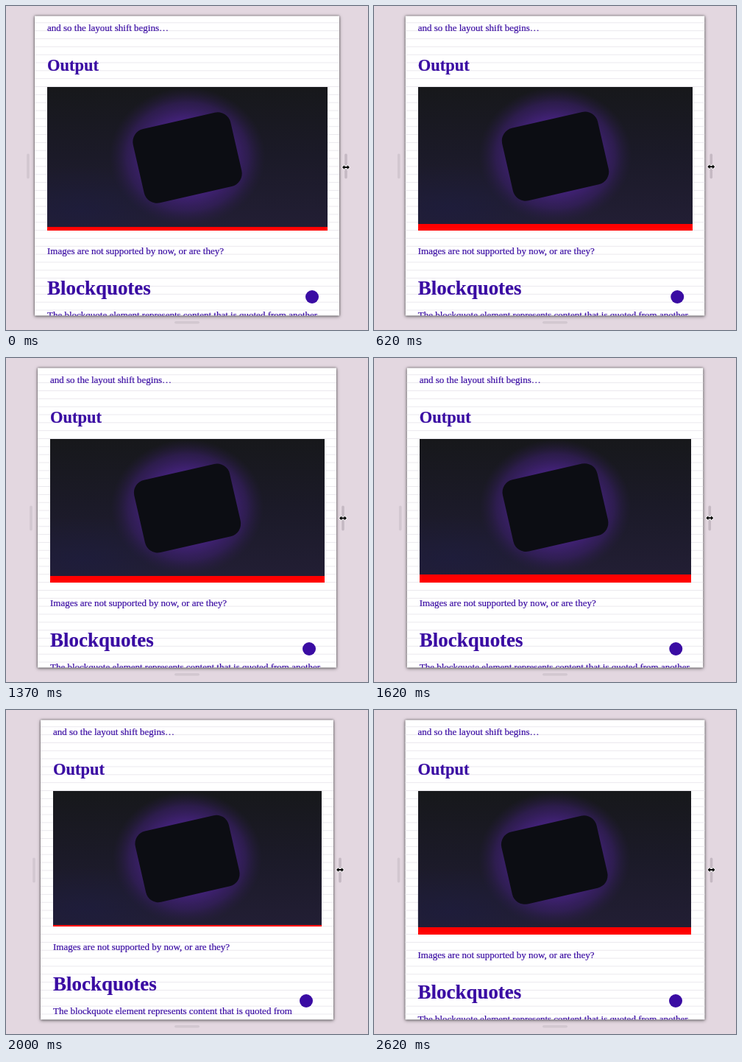
Recreate the animation shown at these times as an HTML page. Size 492x440 px, loop 2750 ms.

```html
<!DOCTYPE html>
<html lang="en">
<head>
<meta charset="utf-8">
<title>Resizing a page</title>
<style>
  html, body { margin: 0; width: 100%; height: 100%; overflow: hidden; background: #e3d7e0; }
  svg { display: block; width: 492px; height: 440px; }
  text {
    font: 13px "Liberation Serif", "Times New Roman", serif;
    fill: #3a0ca3; stroke: #3a0ca3; stroke-width: .2px;
  }
  .h2 { font-size: 22.46px; font-weight: bold; }
  .h1 { font-size: 26.96px; font-weight: bold; }
  #paper { fill: #fff; filter: drop-shadow(0 0 1px rgba(0,0,0,.5)) drop-shadow(0 1px 2px rgba(0,0,0,.5)); }
</style>
</head>
<body>
<svg viewBox="0 0 492 440">
  <defs>
    <clipPath id="clip"><rect id="clipBox" y="13.5" height="407"/></clipPath>
    <linearGradient id="night" x2="0" y2="1">
      <stop offset="0" stop-color="#17181b"/>
      <stop offset=".5" stop-color="#1b1a28"/>
      <stop offset="1" stop-color="#221e34"/>
    </linearGradient>
    <radialGradient id="blue" cx=".12" cy=".85" r=".4">
      <stop offset="0" stop-color="#1b1c48" stop-opacity=".4"/>
      <stop offset="1" stop-color="#1b1c48" stop-opacity="0"/>
    </radialGradient>
    <radialGradient id="glow">
      <stop offset="0" stop-color="#4b2488"/>
      <stop offset=".55" stop-color="#45227e" stop-opacity=".9"/>
      <stop offset=".78" stop-color="#3a1f69" stop-opacity=".6"/>
      <stop offset="1" stop-color="#2a1c48" stop-opacity="0"/>
    </radialGradient>
  </defs>

  <rect id="paper" y="13.5" height="407"/>
  <g clip-path="url(#clip)">
    <path id="rules" stroke="#ebe9ee"/>
    <g id="content">
      <text y="33.6">and so the layout shift begins…</text>
      <text class="h2" y="88">Output</text>
      <rect id="box" y="200" fill="#f00" shape-rendering="crispEdges"/>
      <rect id="sky" y="109.5" fill="url(#night)" shape-rendering="crispEdges"/>
      <g id="picture">
        <rect y="40" width="381" height="150" fill="url(#blue)"/>
        <ellipse cx="190.5" cy="95" rx="106" ry="94" fill="url(#glow)"/>
        <rect x="-68" y="-51.5" width="136" height="103" rx="18" fill="#0c0d13"
              transform="translate(190.5 96.5) rotate(-12.9)"/>
      </g>
      <g id="below">
        <text y="337.2">Images are not supported by now, or are they?</text>
        <text class="h1" y="391.8">Blockquotes</text>
        <text id="quote" y="423.8"></text>
      </g>
      <circle id="button" cy="395" r="9" fill="#3a0ca3"/>
    </g>
  </g>

  <g fill="#d2c7d0">
    <rect id="left" y="200.5" width="3.6" height="34" rx="1.8"/>
    <rect id="right" y="200.5" width="3.6" height="34" rx="1.8" fill="#c5b9c3"/>
    <rect x="229" y="428" width="34" height="3.6" rx="1.8"/>
  </g>
  <path id="cursor" d="M-5 0L-1.8 -3V-1H1.8V-3L5 0L1.8 3V1H-1.8V3Z"
        fill="#000" stroke="#fff" stroke-width="1.4" paint-order="stroke" stroke-linejoin="round"/>
</svg>
<script>
  const LOOP = 2750, UNIT = 10.84, TOP = 109.5, CENTER = 246;
  // Page width at each step of the drag
  const widths = [414, 413.5, 412, 411, 408.5, 406.5, 405.5, 406, 407.5, 409, 407,
                  406, 404, 402.5, 402, 400, 398, 398, 399.3, 403, 404.5, 407];
  const $ = id => document.getElementById(id);
  const set = (id, attrs) => {
    for (const key in attrs) $(id).setAttribute(key, attrs[key]);
  };

  let rules = "";
  for (let k = -8; k < 29; k++) rules += `M0 ${TOP + k * UNIT}H492`;
  set("rules", { d: rules });

  function draw(i) {
    const page = widths[i];
    const x = CENTER - page / 2;
    // Content trails one step behind while the page grows
    const width = Math.min(page, i ? widths[i - 1] : page) - 33;
    const units = Math.ceil(width / 2 / UNIT);
    const bottom = Math.floor(TOP + width / 2);

    set("paper", { x, width: page });
    set("clipBox", { x, width: page });
    set("content", { transform: `translate(${x + 17} 0)` });
    set("box", { width, height: TOP + units * UNIT - 200 });
    set("sky", { width, height: bottom - TOP });
    set("picture", { transform: `translate(0 ${TOP}) scale(${width / 381})` });
    set("below", { transform: `translate(0 ${(units - 18) * UNIT})` });
    set("button", { cx: width - 21 });
    $("quote").textContent = "The blockquote element represents content that is quoted from"
      + (width >= 368 ? " another" : "");

    set("left", { x: x - 10.8 });
    set("right", { x: x + page + 7.2 });
    set("cursor", { transform: `translate(${x + page + 9} ${Math.max(217, 219 - i * 0.14)})` });
  }

  let shown = -1;
  const start = performance.now();
  function tick(now) {
    const t = Math.max(0, now - start) % LOOP;
    const i = Math.min(widths.length - 1, Math.floor((Math.floor(t / 10) + 0.5) / 12.5));
    if (i !== shown) draw(shown = i);
    requestAnimationFrame(tick);
  }
  tick(start);
</script>
</body>
</html>
```
